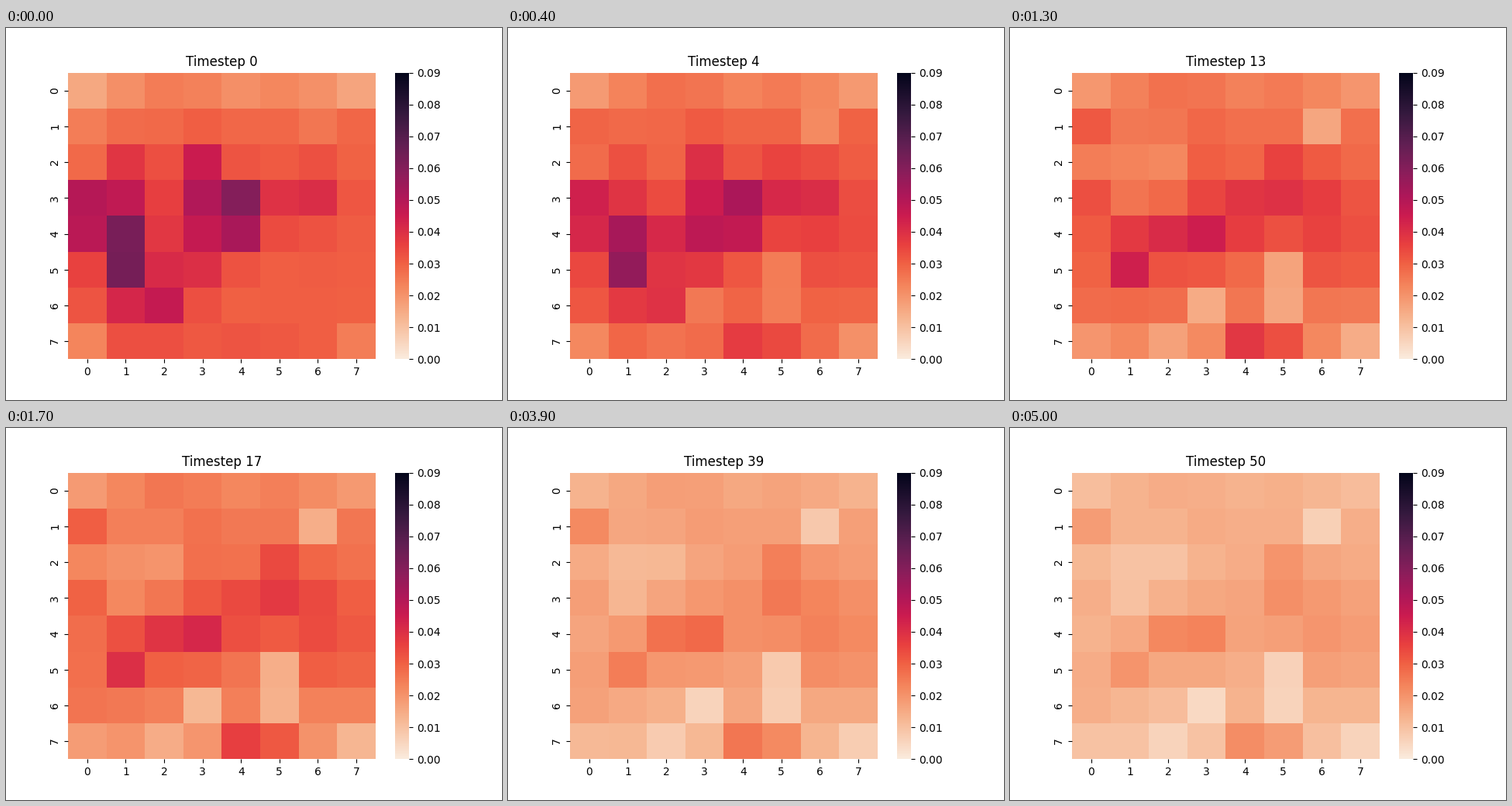
A matplotlib script that plays this animation: 640x480 px, repeating every 5.1 s.

```python
import numpy as np
import matplotlib.pyplot as plt
from matplotlib.animation import FuncAnimation
from matplotlib.colors import LinearSegmentedColormap

STEPS = 51
INTERVAL = 100
VMAX = 0.09
FADE = 10        # steps for the early pattern to give way to the late one
COOLING = 58     # steps over which the late pattern cools
LATE_STEP = 26   # step at which the late strengths apply

RAMP = [
    (0, "#faebdd"), (1 / 7, "#f6b48f"), (1 / 4, "#f4875e"), (1 / 3, "#f06043"),
    (2 / 5, "#e83f3f"), (1 / 2, "#cb1b4f"), (4 / 7, "#ad1759"), (2 / 3, "#841e5a"),
    (3 / 4, "#611f53"), (6 / 7, "#35193e"), (1, "#03051a"),
]

# Soft spots: row, column, strength in thousandths, spread in cells.
EARLY_SPOTS = [
    (3.5, 0, 26, 0.5), (4.5, 1, 45, 0.5), (2.7, 1.1, 20, 0.5),
    (5.9, 1.6, 20, 0.6), (2.5, 3, 27, 0.5), (3.4, 4, 35, 0.5),
    (4.4, 3, 15, 0.6), (3, 5.6, 13, 0.6),
]
LATE_SPOTS = [
    (1, 0, 9, 0.4), (1, 6, -10, 0.4), (2.3, 1.4, -10, 0.7),
    (2.5, 5, 13, 0.5), (4, 2.5, 18, 0.6), (4, 6, 9, 1.2),
    (5, 1, 8, 0.4), (5, 5, -14, 0.4), (6, 3, -13, 0.4),
    (6, 5, -14, 0.5), (7, 4.4, 16, 0.5), (7.4, 2, -13, 0.9),
    (7, 6.7, -9, 0.7),
]

ROWS, COLS = np.mgrid[0:8, 0:8]
CORNERS = ((ROWS - 3.5) * (COLS - 3.5) / 3.5 ** 2) ** 4
GRAIN = 1 + 0.04 * np.random.default_rng(4).standard_normal((8, 8))
BASE = (1 - 0.22 * CORNERS) * GRAIN


def add_spots(field, spots):
    for row, col, strength, spread in spots:
        dist2 = (ROWS - row) ** 2 + (COLS - col) ** 2
        field = field + strength * np.exp(-dist2 / (2 * spread ** 2))
    return field


EARLY = add_spots(31 * BASE - 8 * np.exp(-ROWS), EARLY_SPOTS)
LATE = add_spots(21 * BASE, LATE_SPOTS)


def grid_at(step):
    fade = np.exp(-step / FADE)
    cooling = np.exp((LATE_STEP - step) / COOLING)
    return (fade * EARLY + (1 - fade) * cooling * LATE) / 1000


plt.rcParams["font.family"] = "DejaVu Sans"
fig, ax = plt.subplots(figsize=(6.4, 4.8), dpi=100)
cmap = LinearSegmentedColormap.from_list("heat", RAMP)
mesh = ax.pcolormesh(grid_at(0), cmap=cmap, vmin=0, vmax=VMAX,
                     linewidths=0, edgecolor="white")
ax.set(xlim=(0, 8), ylim=(8, 0))
ax.spines[:].set_visible(False)
centers = np.arange(8) + 0.5
ax.set_xticks(centers, range(8))
ax.set_yticks(centers, range(8), rotation="vertical", va="center")
bar = fig.colorbar(mesh, ax=ax)
bar.outline.set_linewidth(0)
bar.set_ticks(np.arange(10) / 100)
title = ax.set_title("Timestep 0")


def draw(step):
    mesh.set_array(grid_at(step))
    title.set_text(f"Timestep {step}")
    return mesh, title


anim = FuncAnimation(fig, draw, frames=STEPS, interval=INTERVAL,
                     repeat=True, repeat_delay=0)
plt.show()
```
